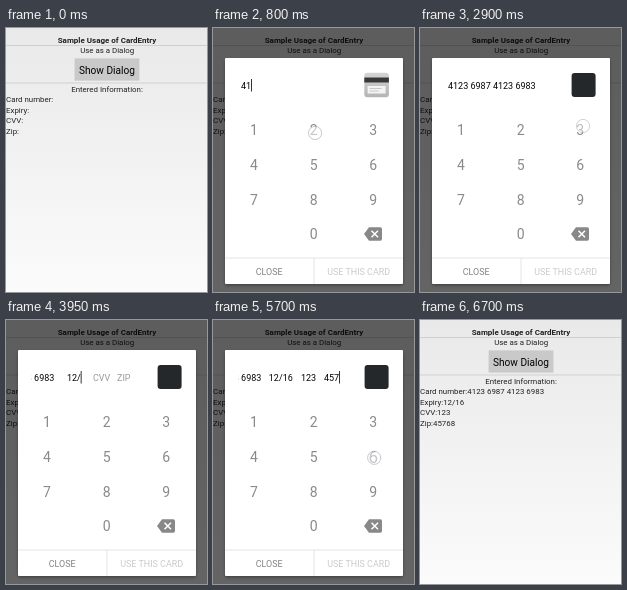
Write an HTML page that moves like this. It is 201x264 px and loops after 6750 ms.

```html
<!DOCTYPE html>
<html lang="en">
<head>
<meta charset="utf-8">
<title>Card entry dialog</title>
<style>
  html, body { margin: 0; width: 100%; height: 100%; overflow: hidden; background: #f4f4f4; }
  svg { display: block; width: 100vw; height: 100vh; }
  text { font-family: Roboto, "Noto Sans", sans-serif; fill: #222; white-space: pre; }
  .mid { text-anchor: middle; }
  #page text { font-size: 7.9px; }
  #page .bold { font-size: 8px; font-weight: 700; }
  #page .button { font-size: 10.1px; fill: #000; }
  #entry text { font-size: 9px; fill: #000; }
  #entry .hint { fill: #999; }
  #keys text { font-size: 14px; fill: #8a8a8a; }
  .action { font-size: 8.95px; fill: #808080; }
</style>
</head>
<body>
<svg viewBox="0 0 201 264" preserveAspectRatio="none">
  <defs>
    <linearGradient id="paper" x2="0" y2="1">
      <stop stop-color="#e9e9e9"/><stop offset="1" stop-color="#fbfbfb"/>
    </linearGradient>
    <linearGradient id="silver" x2="0" y2="1">
      <stop stop-color="#d4d4d4"/><stop offset="1" stop-color="#b4b4b4"/>
    </linearGradient>
    <filter id="soft" x="-10%" y="-10%" width="120%" height="120%">
      <feGaussianBlur stdDeviation="1.6"/>
    </filter>
    <clipPath id="field"><rect x="25" y="47" width="121" height="21"/></clipPath>
  </defs>

  <g id="page">
    <rect width="201" height="264" fill="url(#paper)"/>
    <text class="mid bold" x="101" y="14.5">Sample Usage of CardEntry</text>
    <path d="M0 17.5H201M0 55H201" stroke="#c8c8c8" stroke-width=".8"/>
    <text class="mid" x="101.2" y="25.1">Use as a Dialog</text>
    <rect id="show" x="68.6" y="30.4" width="64.8" height="22.2" fill="#c9c9c9"/>
    <text class="mid button" x="101" y="45.5">Show Dialog</text>
    <text class="mid" x="101" y="63.7">Entered Information:</text>
    <g id="info"></g>
  </g>

  <rect id="dim" width="201" height="264"/>

  <g id="dialog">
    <rect x="12" y="32" width="178" height="225.5" rx="2" opacity=".35" filter="url(#soft)"/>
    <rect x="12" y="30" width="178" height="226" rx="1" fill="#fff"/>
    <g id="entry" clip-path="url(#field)">
      <text id="number" y="60.7"></text>
      <g id="details">
        <text id="expiry" class="mid" x="67.8" y="60.7"></text>
        <text id="cvv" class="mid" x="95.6" y="60.7"></text>
        <text id="zip" x="111" y="60.7"></text>
      </g>
      <rect id="caret" y="51" width=".8" height="12.5"/>
    </g>
    <g id="icon">
      <g id="blank">
        <rect x="-12.3" y="-12.3" width="24.6" height="24.6" rx="3" fill="url(#silver)"/>
        <path d="M-12.3-5H12.3" stroke="#383838" stroke-width="5"/>
        <rect x="-9" y="1" width="18" height="7.5" fill="#f3f3f3"/>
        <path d="M-7 3.5H5M-7 6H2" stroke="#bbb" stroke-width=".8"/>
      </g>
      <rect id="brand" x="-12" y="-12" width="24" height="24" rx="3" fill="#24282a"/>
      <g id="back">
        <rect x="-12" y="-12" width="24" height="24" rx="3" fill="#8c8c8c"/>
        <path d="M-12-6H12" stroke="#151515" stroke-width="5"/>
        <rect x="-9" y="0" width="17" height="6" fill="#eee"/>
        <path d="M-7 3H1" stroke="#aaa" stroke-width=".9"/>
        <ellipse cx="5" cy="3" rx="4.6" ry="3.6" fill="#fff" stroke="#777" stroke-width=".9"/>
      </g>
    </g>
    <g id="keys"></g>
    <path d="M151 206L156 199.2H167.3Q169 199.2 169 201V211Q169 212.8 167.3 212.8H156Z" fill="#888"/>
    <path d="M158.5 202.7L165 209.2M165 202.7L158.5 209.2" stroke="#fff" stroke-width="1.5"/>
    <rect id="tap" x="101" y="230" width="89" height="26" fill="#d8d8d8"/>
    <path d="M12 230H190M101 230V256" stroke="#dedede" stroke-width=".8"/>
    <text class="action mid" x="56.2" y="246.8">CLOSE</text>
    <text class="action mid" id="use" x="145.7" y="246.8">USE THIS CARD</text>
  </g>

  <circle id="touch" r="6.6" fill="#fff" fill-opacity=".5" stroke="#9c9cae" stroke-opacity=".7" stroke-width=".8"/>
</svg>

<script>
const LOOP = 6750, STEP = 50;
const ENTER = 110;   // delay from touch to typed digit
const LIFT = 150;    // time a touch stays visible
const el = id => document.getElementById(id);
const clamp = v => Math.max(0, Math.min(1, v));
const span = (t, from, to) => clamp((t - from) / (to - from));
const ease = p => p * p * (3 - 2 * p);
const set = (node, attrs) => {
  for (const k in attrs) node.setAttribute(k, attrs[k]);
  return node;
};
const addText = (parent, attrs, str) => {
  const node = document.createElementNS("http://www.w3.org/2000/svg", "text");
  node.textContent = str;
  parent.append(set(node, attrs));
  return node;
};

const CARD = "4123698741236983";
const typed = (digits, times) => [...digits].map((d, i) => ({ d, at: times[i] }));
const fields = {
  number: typed(CARD, [...CARD].map((_, i) => 380 + 160 * i)),
  expiry: typed("1216", [3580, 3740, 4240, 4400]),
  cvv: typed("123", [4600, 4760, 4900]),
  zip: typed("45768", [5150, 5310, 5450, 5610, 5750])
};
const presses = Object.values(fields).flat();
const doneAt = name => fields[name].at(-1).at + ENTER;
const hints = { number: "1234 5678 9012 3456", expiry: "MM/YY", cvv: "CVV", zip: "ZIP" };
const group = s => s.replace(/(.{4})(?=.)/g, "$1 ");
const slash = s => s.length < 2 ? s : s.slice(0, 2) + "/" + s.slice(2);
const formats = { number: group, expiry: slash };
const SCROLL = 67.3;

const keyAt = d => d === "0"
  ? [100.7, 206]
  : [41 + 59.6 * ((d - 1) % 3), 102 + 34.8 * Math.floor((d - 1) / 3)];
const keys = [..."1234567890"].map(d => ({ d, node: addText(el("keys"), { class: "mid", y: 5 }, d) }));
const nudges = { 2: [1.5, 3], 3: [2.8, -4], 7: [6.5, 0] };

const lines = ["Card number:", "Expiry:", "CVV:", "Zip:"];
const results = [group(CARD), "12/16", "123", "45768"];
const infoRows = lines.map((s, i) => addText(el("info"), { x: 0, y: 74 + 10.6 * i }, s));

// Each flip swaps one card face for the next
const flips = [
  { at: 820, face: "brand" },
  { at: doneAt("expiry"), face: "back" },
  { at: doneAt("cvv"), face: "brand" }
];

function drawIcon(t) {
  let face = "blank", width = 1;
  for (const f of flips) {
    const p = span(t, f.at, f.at + 240);
    if (p >= .5) face = f.face;
    if (p > 0 && p < 1) width = Math.abs(Math.cos(Math.PI * p));
  }
  for (const id of ["blank", "brand", "back"]) set(el(id), { visibility: id === face ? "inherit" : "hidden" });
  set(el("icon"), { transform: `translate(163.6 57) scale(${Math.max(.03, width)} 1)` });
}

function drawEntry(t) {
  for (const name in fields) {
    const raw = fields[name].filter(k => t >= k.at + ENTER).map(k => k.d).join("");
    const node = el(name);
    node.textContent = raw ? (formats[name] || String)(raw) : hints[name];
    node.classList.toggle("hint", !raw);
  }
  const slide = ease(span(t, 2900, 3150));
  set(el("number"), { x: 28 - SCROLL * slide });
  set(el("details"), { transform: `translate(${SCROLL * (1 - slide)} 0)`, opacity: slide });

  const active = Object.keys(fields).find(name => t < doneAt(name));
  const moving = t >= doneAt("number") && slide < 1;
  set(el("caret"), { visibility: active && !moving ? "inherit" : "hidden" });
  if (active) {
    const node = el(active), width = node.getComputedTextLength();
    const left = node.getAttribute("x") - (node.classList.contains("mid") ? width / 2 : 0);
    set(el("caret"), { x: left + (node.classList.contains("hint") ? 0 : width) });
  }
}

function drawKeys(t) {
  for (const { d, node } of keys) {
    let scale = 1;
    for (const k of presses) {
      if (k.d === d) scale += .7 * Math.sin(Math.PI * span(t, k.at, k.at + 100));
    }
    set(node, { transform: `translate(${keyAt(d)}) scale(${scale})` });
  }
}

const touches = [
  { at: 40, x: 101, y: 43 },
  ...presses.map(k => {
    const [x, y] = keyAt(k.d), [dx, dy] = nudges[k.d] || [1, 1];
    return { at: k.at, x: x + dx, y: y + dy };
  }),
  { at: 6290, x: 146, y: 243 }
];

function drawTouch(t) {
  const hit = touches.findLast(p => t >= p.at && t < p.at + LIFT);
  set(el("touch"), { opacity: hit ? 1 - .6 * span(t, hit.at + 110, hit.at + LIFT) : 0 });
  if (hit) set(el("touch"), { cx: hit.x, cy: hit.y });
}

function draw(t) {
  const shown = ease(span(t, 180, 370)) * (1 - ease(span(t, 6510, 6700)));
  const scale = .9 + .1 * shown;
  set(el("show"), { fill: t >= 50 && t < 230 ? "#a9a9a9" : "#c9c9c9" });
  set(el("dim"), { opacity: .6 * shown });
  set(el("dialog"), {
    opacity: shown,
    transform: `translate(101 143) scale(${scale}) translate(-101 -143)`
  });
  infoRows.forEach((row, i) => row.textContent = lines[i] + (t >= 6550 ? results[i] : ""));
  el("use").style.fill = t >= doneAt("zip") ? "#808080" : "#cacaca";
  set(el("tap"), { opacity: t >= 6300 && t < 6450 ? 1 : 0 });
  drawEntry(t);
  drawIcon(t);
  drawKeys(t);
  drawTouch(t);
}

const start = performance.now();
function frame() {
  const t = (performance.now() - start) % LOOP;
  draw(Math.floor(t / STEP) * STEP);
  requestAnimationFrame(frame);
}
frame();
</script>
</body>
</html>
```
